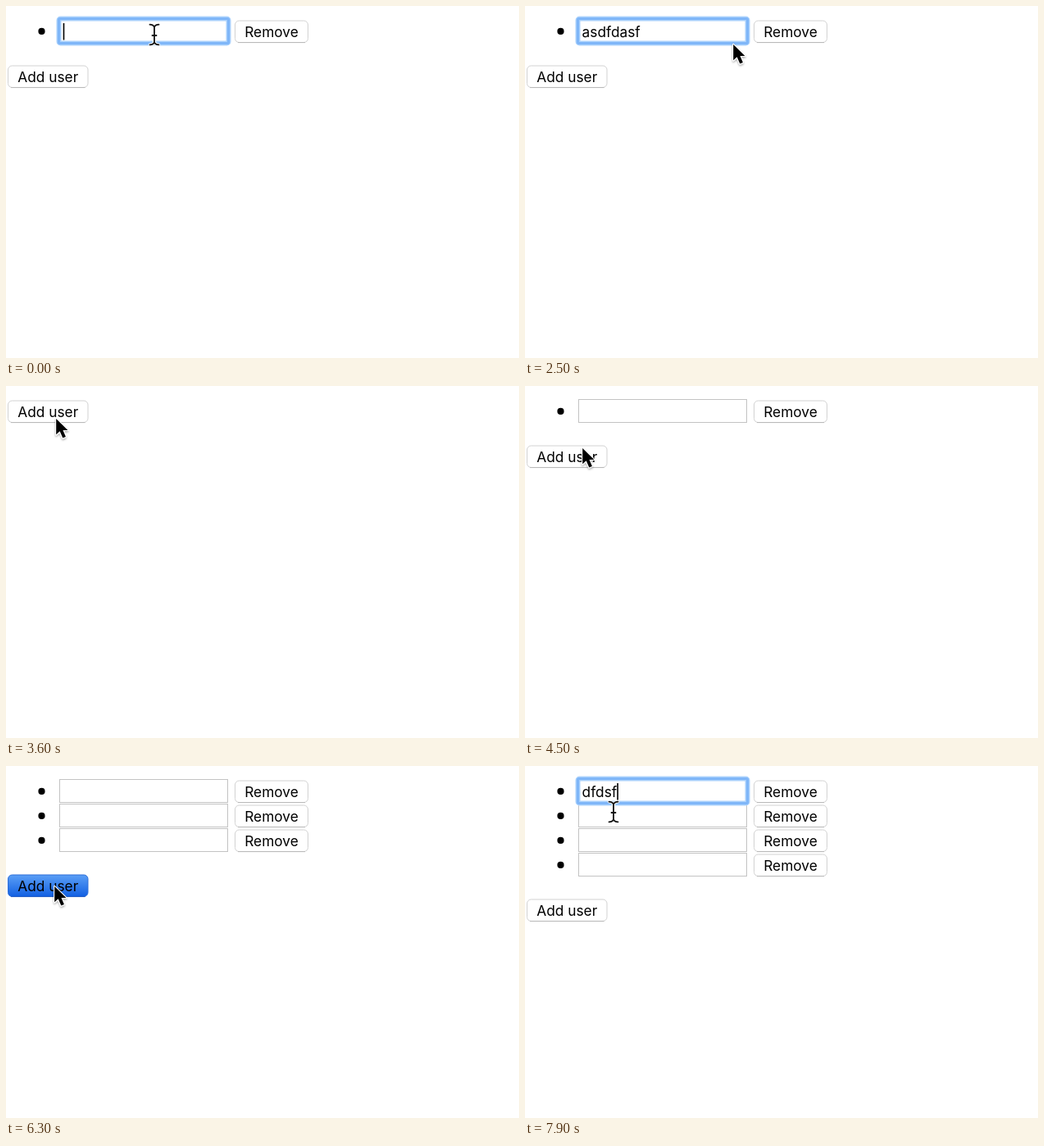
Animation of 626 by 430 pixels, one loop 8 s. Source, as an HTML page:

```html
<!DOCTYPE html>
<html lang="en">
<head>
<meta charset="utf-8">
<title>User list</title>
<style>
  html, body { margin: 0; width: 100%; height: 100%; overflow: hidden; background: #fff; }
  svg { display: block; }
  text { font: 17.3px Inter, Roboto, sans-serif; fill: #000; }
  .label { text-anchor: middle; }
  .face { fill: #fff; stroke: #d2d2d2; }
  .edge { fill: none; stroke: #b8b8b8; }
  .pressed .face { fill: url(#blue); stroke: #2f6fd8; }
  .pressed .edge { stroke: #1a55c4; }
  .field { fill: #fff; stroke: #c3c3c3; }
  #ring { fill: none; }
  #beam { fill: none; stroke-linecap: round; }
</style>
</head>
<body>
<svg width="626" height="430" viewBox="0 0 626 430">
  <defs>
    <linearGradient id="blue" x2="0" y2="1">
      <stop stop-color="#5b9ff6"/>
      <stop offset="1" stop-color="#1260e2"/>
    </linearGradient>
    <filter id="shadow" x="-50%" y="-50%" width="200%" height="200%">
      <feDropShadow dx="0" dy="1.5" stdDeviation="1.3" flood-opacity=".35"/>
    </filter>
    <path id="beamShape"
      d="M-5.5 -12.3Q-1 -12.3 0 -9Q1 -12.3 5.5 -12.3M0 -9V9M-5.5 12.3Q-1 12.3 0 9Q1 12.3 5.5 12.3M-2.5 1H2.5"/>
  </defs>

  <g id="rows"></g>

  <g id="ring">
    <rect x="64.5" y="15.5" width="207" height="30" rx="2" stroke="#abd2fc" stroke-width="6"/>
    <rect x="64.5" y="15.5" width="207" height="30" rx="1.5" stroke="#7fb6f8" stroke-width="3.2"/>
  </g>
  <text id="typed" x="69.6" y="38"></text>
  <rect id="caret" y="21" width="1.6" height="20.5"/>

  <g id="add"></g>

  <g id="arrow" filter="url(#shadow)">
    <path transform="translate(1.2 2) scale(.9)" d="M0 0V21.5L5 17L9 26.2L13 24.5L9.2 15.6H15.8Z"
      stroke="#fff" stroke-width="2.4" stroke-linejoin="round" paint-order="stroke"/>
  </g>
  <g id="beam">
    <use href="#beamShape" stroke="#fff" stroke-width="3.6"/>
    <use href="#beamShape" stroke="#111" stroke-width="1.8"/>
  </g>
</svg>

<script>
const LOOP = 8000, STEP = 100;
const PITCH = 30, TOP = 16, FIELD_HEIGHT = 29;
const TRAVEL = 400, HOLD = 200;
const REMOVED = 3000, ADDED = [3800, 4800, 5700, 6400], FOCUSED = 6900;

// Where the pointer rests, and when it arrives there.
const start = { x: 181, y: 35 };
const stops = [
  { at: 2500, x: 253, y: 45 },
  { at: 2900, x: 321, y: 34 },
  { at: 3600, x: 60, y: 38 },
  { at: 4500, x: 69, y: 74 },
  { at: 5500, x: 65, y: 123 },
  { at: 6200, x: 58, y: 145 },
  { at: 6800, x: 108, y: 30 },
  { at: 7900, x: 108, y: 56 },
];

const $ = id => document.getElementById(id);
const clamp = v => Math.min(1, Math.max(0, v));
const ease = v => v * v * (3 - 2 * v);
const within = (t, from, to) => t >= from && t < to;
const show = (node, on) => node.setAttribute('visibility', on ? 'visible' : 'hidden');
const move = (node, x, y) => node.setAttribute('transform', `translate(${x} ${y})`);

const button = (x, width, label) => `
  <rect class="face" x="${x + .5}" y="18" width="${width - 1}" height="26.5" rx="5"/>
  <path class="edge" d="M${x + 4} 44.6H${x + width - 4}"/>
  <text class="label" x="${x + width / 2}" y="38">${label}</text>`;

const row = i => `<g transform="translate(0 ${i * PITCH})">
  <circle cx="43.5" cy="30.9" r="4.1"/>
  <rect class="field" x="65.5" y="${TOP + .5}" width="205" height="${FIELD_HEIGHT - 1}"/>
  <g class="remove">${button(279, 90, 'Remove')}</g></g>`;

$('rows').innerHTML = ADDED.map((_, i) => row(i)).join('');
$('add').innerHTML = button(2, 98.5, 'Add user');
const rows = [...$('rows').children];
const removeButton = rows[0].querySelector('.remove');

const typing = (text, t, from, delay) =>
  text.slice(0, Math.max(0, Math.floor((t - from) / delay) + 1));

function content(t) {
  return t < REMOVED
    ? typing('asdf', t, 600, 100) + typing('dasf', t, 1200, 100)
    : typing('dfdsf', t, 7400, 50);
}

function pointer(t) {
  return stops.reduce((p, { at, x, y }) => {
    const k = ease(clamp(1 - (at - t) / TRAVEL));
    return { x: p.x + (x - p.x) * k, y: p.y + (y - p.y) * k };
  }, start);
}

function overField({ x, y }, count) {
  const depth = y - TOP;
  return within(x, 65, 271) && within(depth, 0, count * PITCH) && depth % PITCH < FIELD_HEIGHT;
}

function draw(t) {
  const count = t < REMOVED ? 1 : ADDED.filter(at => at <= t).length;
  rows.forEach((node, i) => show(node, i < count));
  move($('add'), 0, count && 25 + count * PITCH);
  $('add').classList.toggle('pressed', ADDED.some(at => within(t, at - HOLD + STEP * (at < 5000), at)));
  removeButton.classList.toggle('pressed', within(t, REMOVED - STEP, REMOVED));

  $('typed').textContent = content(t);
  $('caret').setAttribute('x', 69.7 + $('typed').getComputedTextLength());
  show($('ring'), t < REMOVED - STEP || t >= FOCUSED);
  show($('caret'), t < STEP || within(t, 600, 1900) || t > FOCUSED);

  const tip = pointer(t), beam = overField(tip, count);
  const typingNow = within(t, 600, 2100) || within(t, 7400, 7900);
  move($('arrow'), tip.x, tip.y);
  move($('beam'), tip.x, tip.y);
  show($('arrow'), !typingNow && !beam);
  show($('beam'), !typingNow && beam);
}

const origin = performance.now();
function tick() {
  const t = (performance.now() - origin) % LOOP;
  draw(Math.floor(t / STEP) * STEP);
  requestAnimationFrame(tick);
}
tick();
</script>
</body>
</html>
```
